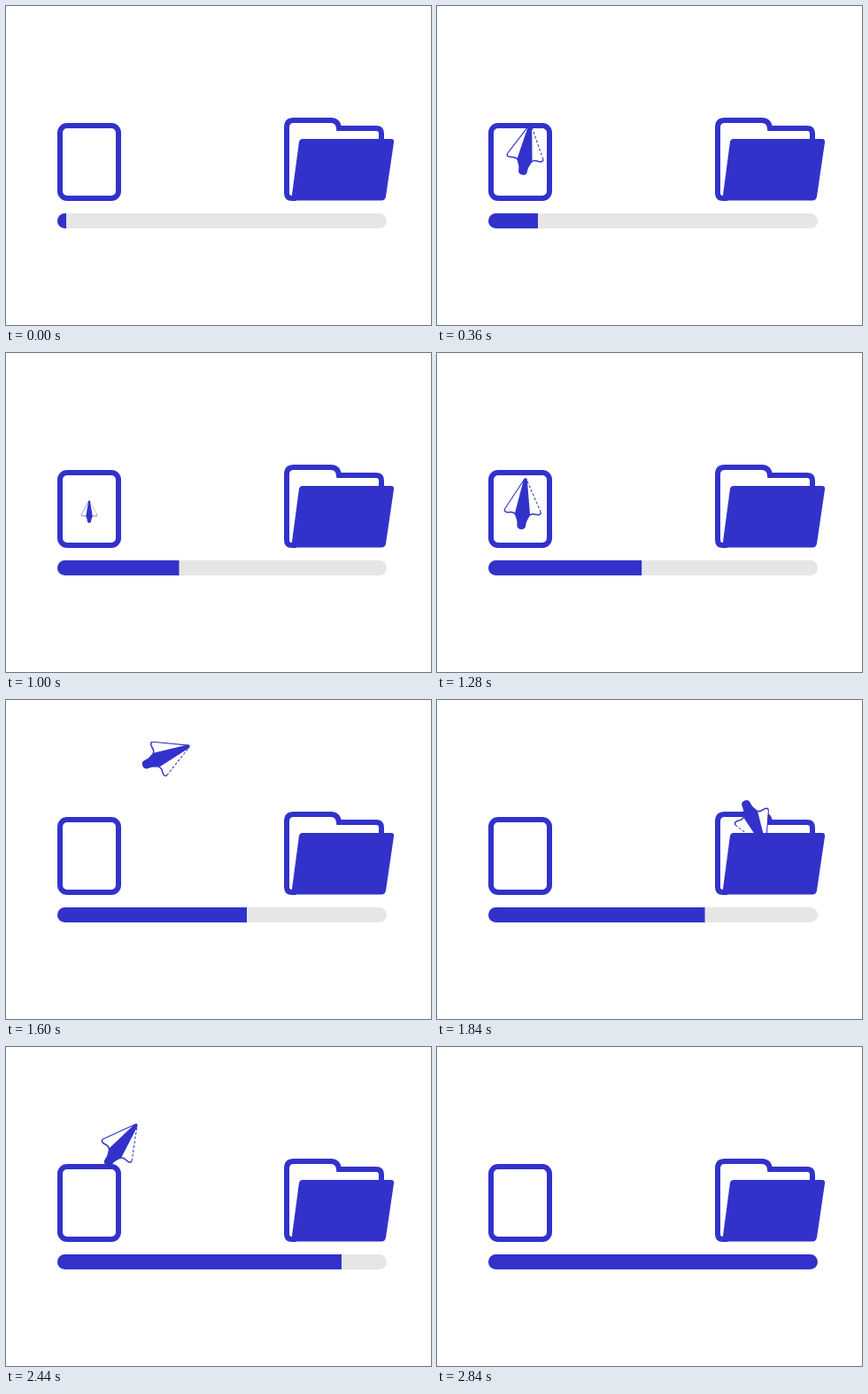
An HTML page for the animation above (2880 ms loop, 480x360 px).

```html
<!DOCTYPE html>
<html lang="en">
<head>
<meta charset="utf-8">
<title>Upload progress</title>
<style>
  html, body { margin: 0; width: 100%; height: 100%; overflow: hidden; background: #fff; }
  svg { display: block; width: 100%; height: 100%; }
  .line { fill: none; stroke: #3232cb; stroke-width: 6; }
  .solid { fill: #3232cb; }
  .wing { fill: none; stroke: #3232cb; stroke-width: 1.5; stroke-linejoin: round; }
  .edge { stroke-width: 1.1; }
  .dots { stroke-width: 1; stroke-dasharray: 3 2; }
</style>
</head>
<body>
<svg viewBox="0 0 480 360">
  <defs>
    <clipPath id="done"><rect id="fill" x="50" y="230" width="0" height="25"/></clipPath>
  </defs>

  <rect class="line" x="61" y="135" width="66" height="82" rx="8"/>
  <path class="line" d="M328 217H323Q317 217 317 211V137Q317 129 325 129H367Q375 129 376 138H418Q424 138 424 144V153"/>

  <g id="plane">
    <path fill="#fff" d="M28 0L-9 -21Q-9 -14 -13 -8V8Q-9 14 -9 21Z"/>
    <path class="wing" d="M-13 -8Q-10 -10 -11 -15Q-12 -21 -8 -20.5M-13 8Q-10 10 -11 15Q-12 21 -8 20.5"/>
    <path class="wing edge" d="M-8 -20.5L28 -1"/>
    <path class="wing dots" d="M-8 20.5L28 1"/>
    <path class="solid" d="M27 -2Q31 0 27 2L-11 8.5C-16 8.5 -17 5 -24 5Q-29 5 -29 0Q-29 -5 -24 -5C-17 -5 -16 -8.5 -11 -8.5Z"/>
  </g>

  <path class="solid" d="M335 150H435Q438.5 150 438 154L429 215Q428 219.5 424 219.5H326Q322 219 323 213L331 153Q332 150 335 150Z"/>

  <rect x="58" y="234" width="372" height="17" rx="8.5" fill="#e6e6e6"/>
  <rect class="solid" x="58" y="234" width="372" height="17" rx="8.5" clip-path="url(#done)"/>
</svg>

<script>
  const LOOP = 2880, FLIGHT = 960, STEP = 40, LANDED = 920;
  const plane = document.getElementById('plane');
  const fill = document.getElementById('fill');

  // time, x, y, heading in degrees
  const keys = [
    [200, 94, 179, -90],
    [320, 97.5, 170, -85],
    [520, 130.5, 110, -53],
    [640, 181, 63, -23],
    [720, 236, 51, 3],
    [800, 303, 72, 30],
    [880, 359, 140, 66],
    [920, 377, 186, 88]
  ];

  const slope = (i, c) => (keys[i + 1][c] - keys[i][c]) / (keys[i + 1][0] - keys[i][0]);

  function tangent(i, c) {
    if (i === 0) return 0;
    if (i === keys.length - 1) return slope(i - 1, c);
    const before = keys[i][0] - keys[i - 1][0];
    const after = keys[i + 1][0] - keys[i][0];
    return (slope(i - 1, c) * after + slope(i, c) * before) / (before + after);
  }

  // Cubic Hermite interpolation of one key column
  function sample(t, c) {
    t = Math.max(t, keys[0][0]);
    let i = 0;
    while (i < keys.length - 2 && t >= keys[i + 1][0]) i++;
    const a = keys[i], b = keys[i + 1], h = b[0] - a[0];
    const u = (t - a[0]) / h, v = 1 - u;
    return a[c] * v * v * (1 + 2 * u) + b[c] * u * u * (3 - 2 * u)
      + h * u * v * (tangent(i, c) * v - tangent(i + 1, c) * u);
  }

  function draw(ms) {
    const t = Math.floor((ms % LOOP) / STEP) * STEP;
    fill.setAttribute('width', 18 + 362 * t / (LOOP - STEP));

    const p = t % FLIGHT;
    const size = 1 - (1 - Math.min(p / 160, 1)) ** 2;
    plane.setAttribute('visibility', size > 0 && p < LANDED ? 'visible' : 'hidden');
    plane.setAttribute('transform',
      `translate(${sample(p, 1)} ${sample(p, 2)}) rotate(${sample(p, 3)}) scale(${size})`);
  }

  const start = performance.now();
  function tick() {
    draw(performance.now() - start + 2);
    requestAnimationFrame(tick);
  }
  tick();
</script>
</body>
</html>
```
